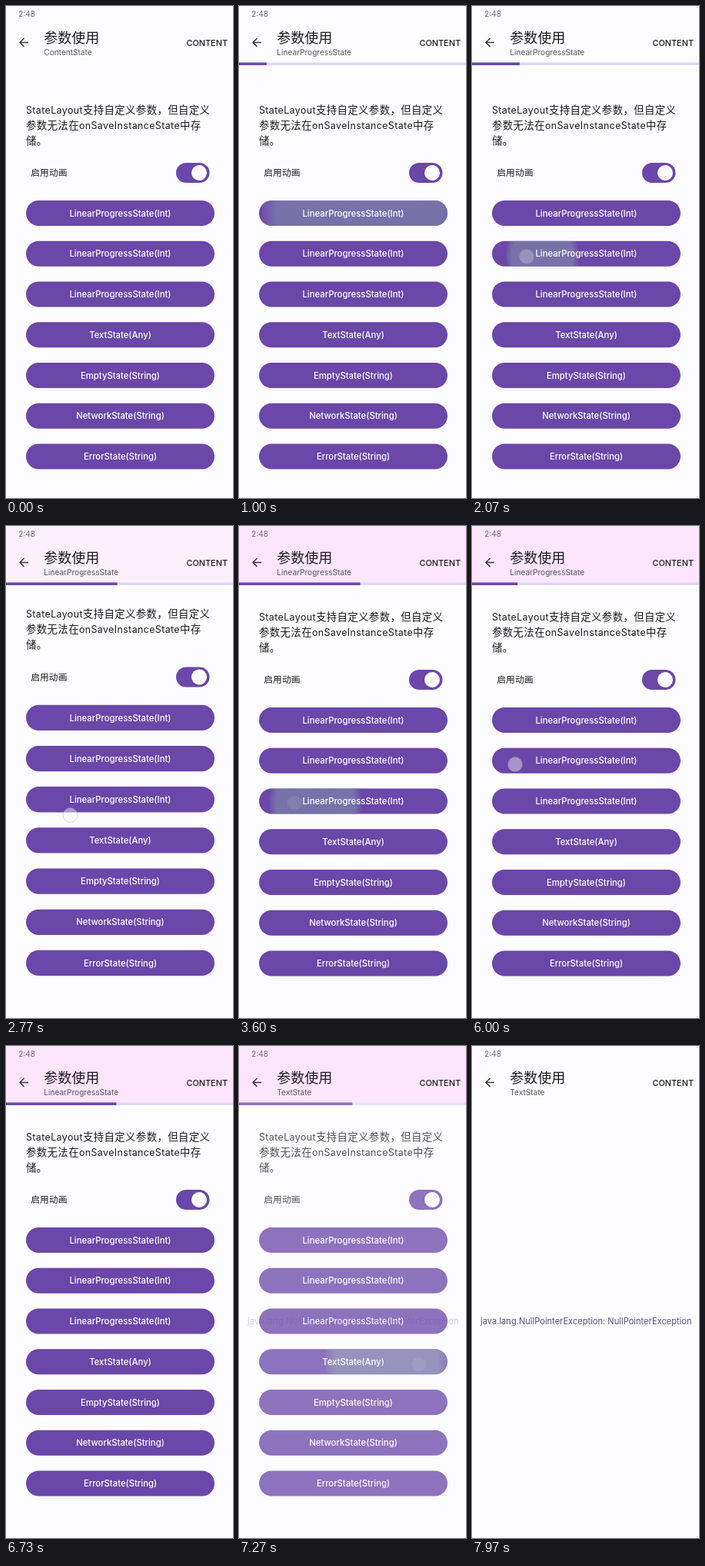
Animation, 295 px wide and 640 px high, one loop 8 s. Source, as an HTML page:

```html
<!DOCTYPE html>
<html lang="zh-CN">
<head>
<meta charset="utf-8">
<title>StateLayout</title>
<style>
  html, body { margin: 0; width: 100%; height: 100%; overflow: hidden; background: #fcfbfe; }
  svg { display: block; width: 100%; height: 100%; }
  text { font-family: Inter, "Noto Sans CJK SC", "Noto Sans CJK", sans-serif; fill: #1c1b1f; white-space: pre; }
  .body { font-size: 13.4px; letter-spacing: .4px; }
  .latin { font-size: 12.4px; }
  .button text { font-size: 11.3px; font-weight: 500; fill: #fff; text-anchor: middle; }
  .purple { fill: #6a47a8; }
</style>
</head>
<body>
<svg viewBox="0 0 295 640">
  <defs>
    <clipPath id="buttonClip"><rect id="clipRect" x="26" width="245" height="33" rx="16.5"/></clipPath>
    <radialGradient id="rippleFill">
      <stop offset=".85" stop-color="#7c82a8" stop-opacity=".72"/>
      <stop offset="1" stop-color="#7c82a8" stop-opacity=".15"/>
    </radialGradient>
  </defs>
  <rect width="295" height="640" fill="#fcfbfe"/>
  <rect id="tint" width="295" height="74" fill="#fde5fe"/>

  <g id="content">
    <text class="body" x="26" y="140"><tspan class="latin">StateLayout</tspan>支持自定义参数，但自定义</text>
    <text class="body" x="26" y="160">参数无法在<tspan class="latin">onSaveInstanceState</tspan>中存</text>
    <text class="body" x="26" y="180">储。</text>
    <text x="32.3" y="221.3" font-size="11.8">启用动画</text>
    <rect class="purple" x="221" y="204" width="43.5" height="26" rx="13"/>
    <circle cx="251" cy="217" r="10" fill="#fff"/>
    <g id="shapes"></g>
    <g clip-path="url(#buttonClip)"><circle id="ripple" fill="url(#rippleFill)"/></g>
    <g id="labels" class="button"></g>
  </g>

  <g id="bar">
    <rect y="73.5" width="295" height="3.5" fill="#ded8fb"/>
    <rect id="progress" class="purple" y="73.5" height="3.5"/>
  </g>

  <text x="16.3" y="14.4" font-size="10" style="fill:#6b6970">2:48</text>
  <path transform="translate(14 38.4) scale(.75)" fill="#3a383e" d="M20 11H7.83l5.59-5.59L12 4l-8 8 8 8 1.41-1.41L7.83 13H20z"/>
  <text x="49.3" y="47.6" font-size="18">参数使用</text>
  <text id="subtitle" x="49.3" y="63.6" font-size="10.1" style="fill:#57555c"></text>
  <text x="288" y="51.8" font-size="10.9" font-weight="500" text-anchor="end">CONTENT</text>
  <text id="error" x="148.3" y="362" font-size="11.1" text-anchor="middle" style="fill:#55537f">java.lang.NullPointerException: NullPointerException</text>
  <circle id="touch" r="9.5" fill="#fff" fill-opacity=".42" stroke="#8080b0" stroke-opacity=".4" stroke-width=".8"/>
</svg>
<script>
const LOOP = 8000, WIDTH = 295, MID = 148.5, MAX_SCROLL = 17;
const $ = id => document.getElementById(id);
const set = (id, attrs) => { for (const k in attrs) $(id).setAttribute(k, attrs[k]); };
const clamp = v => Math.min(1, Math.max(0, v));
const ramp = (t, from, to) => clamp((t - from) / (to - from));
const easeOut = p => 1 - (1 - p) ** 2;

const buttons = ['LinearProgressState(Int)', 'LinearProgressState(Int)', 'LinearProgressState(Int)',
  'TextState(Any)', 'EmptyState(String)', 'NetworkState(String)', 'ErrorState(String)'];
const buttonTop = i => 253 + 52.75 * i;
buttons.forEach((label, i) => {
  const y = buttonTop(i);
  $('shapes').innerHTML += `<rect class="purple" x="26" y="${y}" width="245" height="33" rx="16.5"/>`;
  $('labels').innerHTML += `<text x="${MID}" y="${y + 20.6}">${label}</text>`;
});

// Each tap: screen position, press and release times, button index, resulting progress
const taps = [
  { x: 200, y: 270, down: 640, up: 710, button: 0, goal: .2 },
  { x: 71, y: 326, down: 1960, up: 2030, button: 1, goal: .5 },
  { x: 72, y: 360, down: 3450, up: 3520, button: 2, goal: .8 },
  { x: 213, y: 257, down: 4560, up: 4634, button: 0, goal: .2 },
  { x: 56, y: 310, down: 5970, up: 6050, button: 1, goal: .5 },
  { x: 234, y: 414, down: 7060, up: 7190, button: 3 }
];
const drag = { x: 83.5, y: 408, down: 2560, up: 2850 };
const touches = [...taps, drag];
const SHOW_BAR = taps[0].up, SHOW_ERROR = taps[5].up;

// Critically damped spring, stiffness 50
function spring(ms) {
  const w = Math.sqrt(50) * Math.max(0, ms) / 1000;
  return 1 - Math.exp(-w) * (1 + w);
}

function drawTouch(t) {
  const touch = touches.find(p => t >= p.down && t < p.up + 100);
  if (!touch) return set('touch', { opacity: 0 });
  const moved = touch === drag ? 32 * ramp(t, 2600, 2770) : 0;
  set('touch', { cx: touch.x, cy: touch.y - moved, opacity: 1 - ramp(t, touch.up, touch.up + 100) });
}

function drawRipple(t) {
  const tap = taps.find(p => t >= p.down + 40 && t < p.down + 600);
  if (!tap) return set('ripple', { r: 0 });
  const p = ramp(t, tap.down, tap.down + 425), top = buttonTop(tap.button);
  const startY = tap.y + (tap.down > drag.up ? MAX_SCROLL : 0);
  set('clipRect', { y: top });
  set('ripple', {
    cx: tap.x + (MID - tap.x) * p,
    cy: startY + (top + 16.5 - startY) * p,
    r: 12 + 135 * p,
    opacity: 1 - ramp(t, tap.down + 425, tap.down + 600)
  });
}

function draw(t) {
  const scroll = MAX_SCROLL * ramp(t, 2620, 2720);
  const stretch = 1 + .008 * ramp(t, 2720, 2770) * (1 - easeOut(ramp(t, 2850, 3100)));
  const swap = ramp(t, SHOW_ERROR, SHOW_ERROR + 330);
  const progress = taps.filter(p => p.goal)
    .reduce((v, p) => v + (p.goal - v) * spring(t - p.up), 0);

  set('content', {
    transform: `translate(0 640) scale(1 ${stretch}) translate(0 ${-640 - scroll})`,
    opacity: 1 - swap
  });
  set('tint', { opacity: ramp(t, 2680, 2860) * (1 - ramp(t, 7300, 7470)) });
  set('bar', { opacity: ramp(t, SHOW_BAR, SHOW_BAR + 300) * (1 - swap) });
  set('progress', { width: WIDTH * progress });
  set('error', { opacity: swap });
  $('subtitle').textContent =
    t < SHOW_BAR ? 'ContentState' : t < SHOW_ERROR ? 'LinearProgressState' : 'TextState';
  drawRipple(t);
  drawTouch(t);
}

function frame() {
  draw(performance.now() % LOOP);
  requestAnimationFrame(frame);
}
frame();
</script>
</body>
</html>
```
